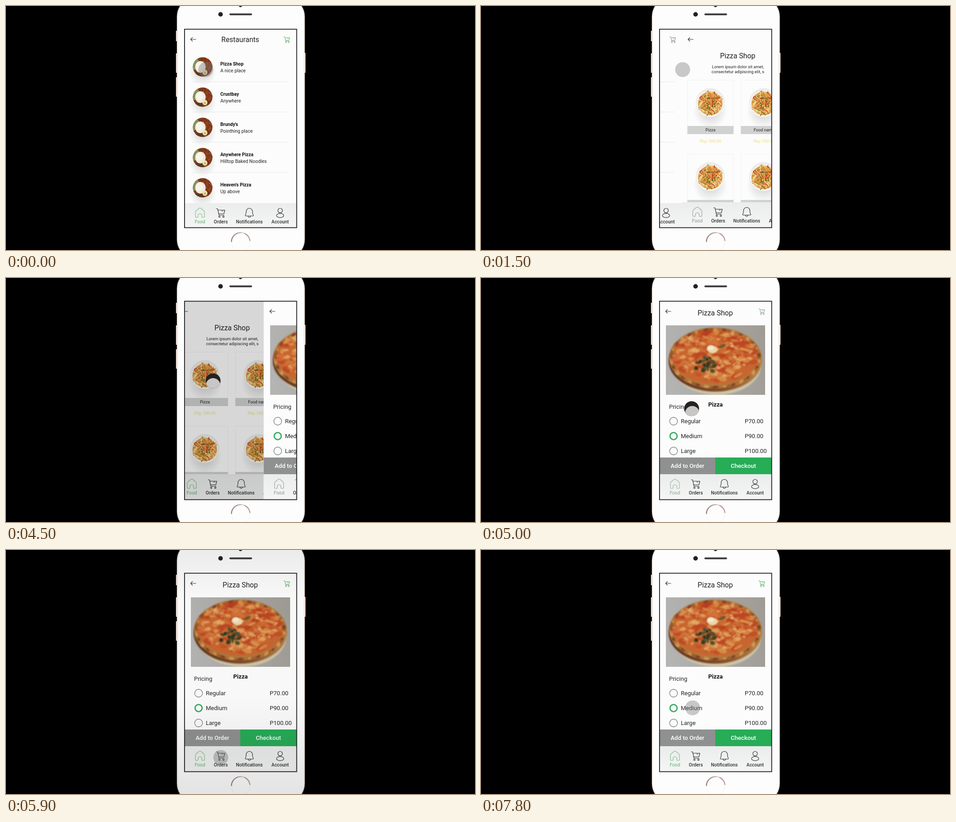
Recreate the animation shown at these times as an HTML page with a canvas. Size 1035x541 px, loop 8000 ms.

```html
<!DOCTYPE html>
<html lang="en">
<head>
<meta charset="utf-8">
<title>Food ordering app</title>
<style>
  html, body { margin: 0; width: 100%; height: 100%; overflow: hidden; background: #000; }
  canvas { display: block; }
</style>
</head>
<body>
<canvas id="stage" width="1035" height="541"></canvas>
<script>
const c = document.getElementById('stage').getContext('2d');
const LOOP = 8000, STEP = 100, WIDTH = 246;
const GREEN = '#7dbf8a', GREY = '#a2a5a3', INK = '#333';

const icons = {
  home: new Path2D('M-10-1Q-10-3-8-5L-2-10Q0-11.5 2-10L8-5Q10-3 10-1V8Q10 10 8 10H6Q4 10 4 8V5Q4 2 0 2Q-4 2-4 5V8Q-4 10-6 10H-8Q-10 10-10 8Z'),
  cart: new Path2D('M-10-9H-7L-4 5H7M-6.5-6H9L7 2H-4.8M2-4H5M-1.5 8.5a1.6 1.6 0 1 1-3.2 0a1.6 1.6 0 1 1 3.2 0M7.5 8.5a1.6 1.6 0 1 1-3.2 0a1.6 1.6 0 1 1 3.2 0'),
  bell: new Path2D('M-8 7Q-10 6-8 3.5Q-7 2-7-3A7 7 0 0 1 7-3Q7 2 8 3.5Q10 6 8 7ZM-3 7Q-2.5 10 0 10Q2.5 10 3 7'),
  user: new Path2D('M5-5a5 5 0 1 1-10 0a5 5 0 1 1 10 0M8 6a8 4.6 0 1 1-16 0a8 4.6 0 1 1 16 0'),
  back: new Path2D('M6 0H-5.5M-1.5-4L-5.5 0L-1.5 4')
};

function seeded(seed) {
  return () => (seed = seed * 16807 % 2147483647) / 2147483647;
}

function rect(x, y, w, h, color) {
  c.fillStyle = color;
  c.fillRect(x, y, w, h);
}

function oval(x, y, rx, ry, color, turn = 0) {
  c.fillStyle = color;
  c.beginPath();
  c.ellipse(x, y, rx, ry, turn, 0, 7);
  c.fill();
}

function ring(x, y, r, color, width) {
  c.strokeStyle = color;
  c.lineWidth = width;
  c.beginPath();
  c.arc(x, y, r, 0, 7);
  c.stroke();
}

function text(str, x, y, size, { color = '#222', weight = 400, align = 'left' } = {}) {
  c.font = `${weight} ${size}px Roboto, sans-serif`;
  c.textAlign = align;
  c.textBaseline = 'alphabetic';
  c.fillStyle = color;
  c.fillText(str, x, y + size * 0.355);
}

function icon(name, x, y, color = INK, scale = 1) {
  c.save();
  c.translate(x, y);
  c.scale(scale, scale);
  c.strokeStyle = color;
  c.lineWidth = 1.2 / scale;
  c.lineJoin = c.lineCap = 'round';
  c.stroke(icons[name]);
  c.restore();
}

function clipped(shape, draw) {
  c.save();
  c.beginPath();
  shape();
  c.clip();
  draw();
  c.restore();
}

function gradient(x0, y0, x1, y1, stops) {
  const g = c.createLinearGradient(x0, y0, x1, y1);
  for (const [at, color] of stops) g.addColorStop(at, color);
  return g;
}

function softShadow(x, y, r) {
  const g = c.createRadialGradient(x, y, 0, x, y, r);
  g.addColorStop(0, 'rgba(90,90,90,.28)');
  g.addColorStop(1, 'rgba(90,90,90,0)');
  oval(x, y, r, r, g);
}

// Dishes

function riceBowl(x, y) {
  const rnd = seeded(41);
  softShadow(x, y + 12, 30);
  clipped(() => c.arc(x, y, 21.5, 0, 7), () => {
    rect(x - 22, y - 22, 44, 44, '#7d3a1d');
    oval(x - 17, y - 6, 9, 13, '#87915a', 0.3);
    for (let i = 0; i < 45; i++) {
      const color = ['#94451f', '#652c17', '#a9542c', '#823317'][i % 4];
      oval(x - 3 + rnd() * 26, y - 20 + rnd() * 40, 2 + rnd() * 2, 1.5, color, rnd() * 3);
    }
    oval(x - 8, y + 17, 10, 5, '#5d3822');
    oval(x - 5, y, 11.5, 13, '#f0eadc');
    oval(x - 7, y - 2, 8, 9, '#f8f4ea');
    oval(x + 5, y + 12, 5.5, 6, '#efe2b5');
    oval(x + 5, y + 13, 2.6, 2.8, '#d9b35a');
  });
}

function pasta(x, y) {
  const rnd = seeded(97);
  const colors = ['#e3ab55', '#efcb83', '#cf8637', '#c44a24', '#f3dba3', '#a3742e', '#dfa04d'];
  softShadow(x, y + 19, 38);
  oval(x, y, 32, 32, '#ececea');
  oval(x, y + 3, 30, 29, '#f5f4f1');
  oval(x, y + 2, 27, 26, '#d99b49');
  c.lineCap = 'round';
  for (let i = 0; i < 130; i++) {
    const a = rnd() * 6.28, r = 25 * Math.sqrt(rnd()), turn = rnd() * 6.28;
    const px = x + r * Math.cos(a), py = y + 2 + r * Math.sin(a);
    const dx = 5 * Math.cos(turn), dy = 5 * Math.sin(turn);
    c.strokeStyle = colors[i % colors.length];
    c.lineWidth = 1.4 + rnd() * 1.4;
    c.beginPath();
    c.moveTo(px - dx, py - dy);
    c.quadraticCurveTo(px + dy / 2, py - dx / 2, px + dx, py + dy);
    c.stroke();
  }
  for (let i = 0; i < 16; i++) {
    oval(x - 8 + rnd() * 18, y - 12 + rnd() * 26, 2.2, 1.2, '#6b6a25', rnd() * 3);
  }
}

function pizza() {
  const rnd = seeded(23);
  const scatter = (n, colors, size) => {
    for (let i = 0; i < n; i++) {
      const a = rnd() * 6.28, r = Math.sqrt(rnd());
      oval(517 + 89 * r * Math.cos(a), 172 + 54 * r * Math.sin(a),
        size * (0.6 + rnd()), size * (0.3 + rnd() * 0.4), colors[i % colors.length], rnd() * 1.2 - 0.6);
    }
  };
  clipped(() => c.rect(408, 105, 219, 154), () => {
    rect(408, 105, 219, 154, gradient(408, 200, 627, 160, [[0, '#b4b4b3'], [0.5, '#aaa8a4'], [1, '#a09c95']]));
    c.filter = 'blur(1.5px)';
    oval(520, 194, 98, 65, '#cfc3a8');
    oval(517, 184, 103, 68, gradient(415, 0, 620, 0, [[0, '#5b3520'], [0.6, '#84512b'], [1, '#b98550']]));
    oval(517, 177, 102, 67, '#b5763c');
    oval(517, 174, 95, 60, '#c8652f');
    for (let i = 0; i < 60; i++) {
      const a = i / 60 * 6.28;
      oval(517 + 97 * Math.cos(a), 178 + 64 * Math.sin(a), 3 + rnd() * 5, 2 + rnd() * 2,
        ['#9b5c2d', '#cf9853', '#b06f36', '#7a4526'][i % 4], a + 1.5);
    }
    c.globalAlpha = 0.65;
    scatter(110, ['#bd4420', '#d57a3e', '#b63a1c', '#e0a058'], 9);
    scatter(80, ['#e8b870', '#c14a25', '#e4a75d', '#d3723a'], 7);
    scatter(90, ['#edc88b', '#b53c1e', '#dc924c'], 4);
    c.globalAlpha = 1;
    for (let i = 0; i < 22; i++) {
      oval(472 + rnd() * 48, 202 - i * 1.4 + rnd() * 8, 3 + rnd() * 4, 2 + rnd() * 2.5,
        ['#343c22', '#4a5030', '#2b301d', '#5c4d2a'][i % 4], rnd() * 3);
    }
    oval(533, 151, 8, 3, '#5c5932', -0.5);
    oval(510, 158, 12, 8.5, '#edd6ab', 0.2);
    oval(507, 155, 7, 5, '#f4e8ce');
  });
}

// Screens

function blank() {
  rect(394, 51, 248, 441, '#fbfcfb');
}

function header(accent) {
  icon('back', 413, 74);
  icon('cart', 620, 74.5, accent, 0.68);
}

function nav(top, accent) {
  rect(394, top, 248, 492 - top, gradient(0, top, 0, 492, [[0, '#ebecec'], [1, '#f4f5f4']]));
  const items = [['home', 'Food', 428], ['cart', 'Orders', 474], ['bell', 'Notifications', 537], ['user', 'Account', 605]];
  items.forEach(([name, label, x], i) => {
    const color = i ? INK : accent;
    icon(name, x, top + 21.5, color);
    text(label, x, top + 41, 10.3, { color, weight: 500, align: 'center' });
  });
}

function listScreen(accent) {
  blank();
  header(accent);
  text('Restaurants', 517, 74, 15.6, { align: 'center' });
  const rows = [
    ['Pizza Shop', 'A nice place'],
    ['Crustbay', 'Anywhere'],
    ["Brundy's", 'Pointhing place'],
    ['Anywhere Pizza', 'Hilltop Baked Noodles'],
    ["Heaven's Pizza", 'Up above']
  ];
  rows.forEach(([name, place], i) => {
    const y = 135 + 67 * i;
    riceBowl(434, y);
    text(name, 473, y - 7, 10.2, { weight: 700, color: '#111' });
    text(place, 473, y + 8, 10.4);
    if (i < 4) rect(410, y + 32.5, 213, 1, '#e6e7e6');
  });
  nav(437, accent);
}

function menuScreen(accent) {
  blank();
  header(accent);
  text('Pizza Shop', 517, 110, 15.8, { align: 'center' });
  text('Lorem ipsum dolor sit amet,', 517.5, 135, 9.2, { align: 'center' });
  text('consectetur adipiscing elit, s', 517.5, 146, 9.2, { align: 'center' });
  for (const y of [164, 328]) {
    [406, 524].forEach((x, i) => {
      c.strokeStyle = '#f0f1f0';
      c.lineWidth = 1;
      c.strokeRect(x + 0.5, y + 0.5, 101, 102);
      pasta(x + 50.5, y + 50);
      rect(x, y + 102, 102, 18, '#d0d1d1');
      text(i ? 'Food name' : 'Pizza', x + 51, y + 111, 9.1, { align: 'center' });
      text('Php 100.00', x + 51, y + 136, 9.4, { color: '#eddc84', align: 'center' });
    });
  }
  nav(435, accent);
}

function itemScreen(accent) {
  blank();
  header(accent);
  text('Pizza Shop', 517, 77, 15.8, { align: 'center' });
  pizza();
  text('Pizza', 517.5, 280, 13, { weight: 700, color: '#111', align: 'center' });
  text('Pricing', 415, 285, 13);
  [['Regular', 'P70.00'], ['Medium', 'P90.00'], ['Large', 'P100.00']].forEach(([size, price], i) => {
    const y = 317.5 + 33 * i;
    if (i === 1) ring(425, y, 7.8, '#35aa63', 2.8);
    else ring(425, y, 8.6, '#666', 1.1);
    text(size, 441, y, 13);
    text(price, 582, y, 13.1);
  });
  rect(394, 398, 123, 37, '#8f9090');
  rect(517, 398, 125, 37, '#27ac58');
  text('Add to Order', 455.5, 416.5, 13.1, { color: '#fff', weight: 500, align: 'center' });
  text('Checkout', 579, 416.5, 13.1, { color: '#fff', weight: 500, align: 'center' });
  nav(435, accent);
}

function shifted(dx, draw) {
  c.save();
  c.translate(dx, 0);
  draw();
  c.restore();
}

function phone() {
  rect(0, 0, 1035, 541, '#000');
  for (const [x, y, h] of [[375, 55, 23], [375, 105, 43], [375, 158, 43], [658, 104, 44]]) {
    rect(x, y, 3, h, '#eedcd1');
  }
  c.fillStyle = '#fdfdfd';
  c.strokeStyle = '#efdfd6';
  c.lineWidth = 2;
  c.beginPath();
  c.roundRect(378, -20, 280.5, 581, 44);
  c.fill();
  c.stroke();
  oval(473.5, 18.5, 5, 5, '#222');
  oval(517.5, -1, 3.5, 3.5, '#222');
  c.fillStyle = '#3a3837';
  c.beginPath();
  c.roundRect(493, 16.5, 50, 4, 2);
  c.fill();
  ring(518, 523, 20.5, '#f3efed', 1);
  c.strokeStyle = gradient(497, 0, 540, 0,
    [[0, '#8f7670'], [0.45, '#b79b93'], [0.62, '#e8d9d3'], [0.72, '#9c8179'], [1, '#bba097']]);
  c.lineWidth = 2.2;
  c.beginPath();
  c.arc(518, 523, 20.5, Math.PI, -0.1);
  c.stroke();
}

// Motion

const ramp = (t, from, to) => Math.min(1, Math.max(0, (t - from) / (to - from)));

const path = [
  [0, 441, 141], [300, 445, 141], [2100, 445, 141], [2600, 457, 228],
  [4900, 457, 228], [5300, 488, 475], [5800, 474, 460], [7100, 474, 460],
  [7500, 467, 350], [LOOP, 467, 350]
];

function cursor(t) {
  const i = path.findIndex(p => p[0] > t);
  const [t0, x0, y0] = path[i - 1], [t1, x1, y1] = path[i];
  const k = ramp(t, t0, t1);
  const x = x0 + (x1 - x0) * k, y = y0 + (y1 - y0) * k;
  if (t < 2100 || t >= 5800) {
    oval(x, y, 16.5, 16.5, 'rgba(120,120,120,.4)');
    return;
  }
  // Dark disc with a pale one sliding out from under its rim
  clipped(() => c.arc(x, y, 16.5, 0, 7), () => {
    rect(x - 17, y - 17, 34, 34, '#242322');
    oval(x + 6 * ramp(t, 4900, 5300), y + 10 * ramp(t, 2000, 2400), 16, 16, '#c9c7c5');
  });
}

function screens(t) {
  if (t < 1600) {
    const p = ramp(t, 1000, 1600) ** 1.23;
    shifted(-WIDTH * p, () => listScreen(p ? GREY : GREEN));
    if (p) shifted(WIDTH * (1 - p), () => menuScreen(GREY));
  } else if (t < 4700) {
    const p = t < 4500 ? 0 : 0.29;
    shifted(-62 * p, () => menuScreen(GREEN));
    if (p) {
      rect(394, 51, 248, 441, 'rgba(0,0,0,.15)');
      shifted(WIDTH * (1 - p), () => itemScreen(GREY));
    }
  } else {
    itemScreen(t < 5900 ? '#a3b5a6' : GREEN);
  }
}

// Shade at the top and bottom of the stage, clear in the middle
function shade(amount) {
  c.globalAlpha = amount;
  rect(0, 0, 1035, 541, gradient(0, 0, 0, 541,
    [[0, 'rgba(0,0,0,.14)'], [0.2, 'rgba(0,0,0,.03)'], [0.6, 'rgba(0,0,0,.03)'], [1, 'rgba(0,0,0,.2)']]));
  c.globalAlpha = 1;
}

function draw(t) {
  phone();
  clipped(() => c.rect(394, 51, 248, 441), () => {
    screens(t);
    cursor(t);
  });
  c.strokeStyle = '#1c1c1c';
  c.lineWidth = 1.8;
  c.strokeRect(394, 51.5, 247.5, 440);
  shade(ramp(t, 5800, 6000) - ramp(t, 7000, 7500));
}

let last = -1;
function tick() {
  const t = Math.floor(performance.now() % LOOP / STEP) * STEP;
  if (t !== last) draw(last = t);
  requestAnimationFrame(tick);
}
tick();
</script>
</body>
</html>
```
